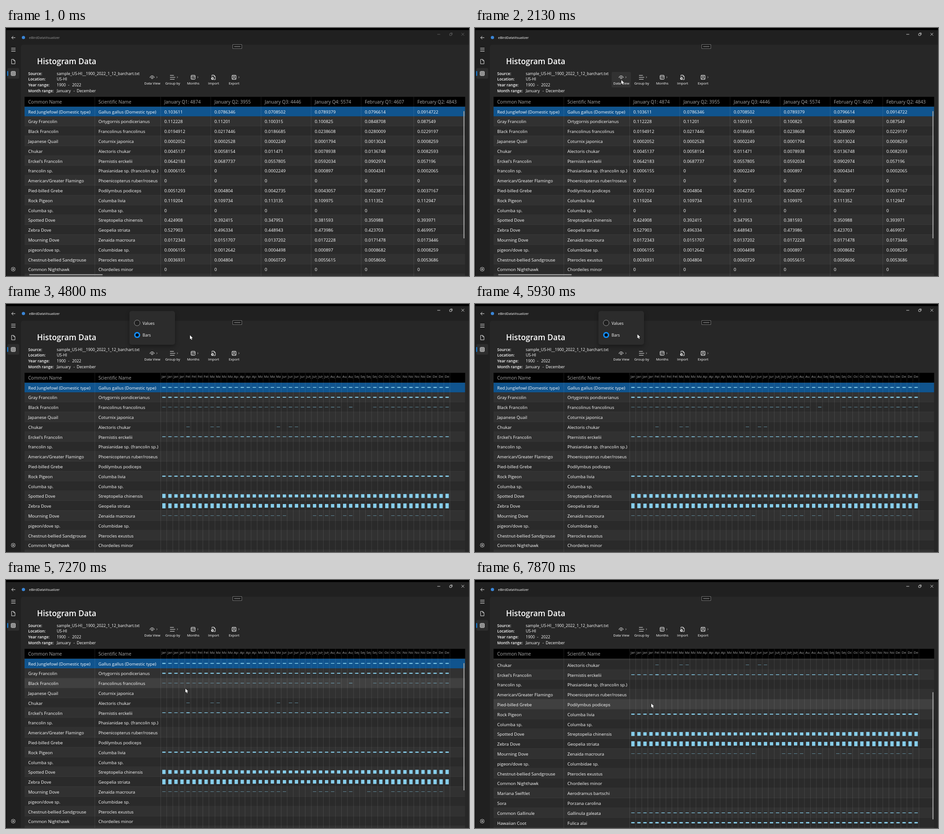
Recreate the animation shown at these times as an HTML page with a canvas. Size 1022x548 px, loop 8 s.

```html
<!DOCTYPE html>
<html lang="en">
<head>
<meta charset="utf-8">
<title>Histogram Data</title>
<style>
html, body { margin: 0; width: 100%; height: 100%; overflow: hidden; background: #202020; }
canvas { display: block; width: 1022px; height: 548px; }
</style>
</head>
<body>
<canvas id="stage"></canvas>
<script>
const W = 1022, H = 548, LOOP = 8000, TICK = 1000 / 15;
const canvas = document.getElementById('stage');
const ctx = canvas.getContext('2d');
const dpr = window.devicePixelRatio || 1;
canvas.width = W * dpr;
canvas.height = H * dpr;

const FONT = '"Open Sans", "Noto Sans", sans-serif';
const TOP = 173.6, ROW = 21.8, LEFT = 41, RIGHT = 1013.5;
const BAR_LEFT = 341.5, PITCH = 13.3, BARS = 48;
const SKY = '#87ceeb';

const columns = [
  [196, 'Scientific Name'], [341.5, 'January Q1: 4874'], [452, 'January Q2: 3955'],
  [563, 'January Q3: 4446'], [673.5, 'January Q4: 5574'],
  [784, 'February Q1: 4607'], [900, 'February Q2: 4843']
];
const months = 'January February March April May June July August September October November December'.split(' ');

const birds = `Red Junglefowl (Domestic type)|Gallus gallus (Domestic type)|0.103611 0.0786346 0.0708502 0.0789379 0.0796614 0.0914722
Gray Francolin|Ortygornis pondicerianus|0.112228 0.11201 0.100315 0.100825 0.0848708 0.087549
Black Francolin|Francolinus francolinus|0.0194912 0.0217446 0.0186685 0.0238608 0.0280009 0.0229197
Japanese Quail|Coturnix japonica|0.0002052 0.0002528 0.0002249 0.0001794 0.0013024 0.0008259
Chukar|Alectoris chukar|0.0045137 0.0058154 0.011471 0.0078938 0.0136748 0.0082593
Erckel's Francolin|Pternistis erckelii|0.0642183 0.0687737 0.0557805 0.0592034 0.0902974 0.057196
francolin sp.|Phasianidae sp. (francolin sp.)|0.0006155 0 0.0002249 0.000897 0.0004341 0.0002065
American/Greater Flamingo|Phoenicopterus ruber/roseus|0 0 0 0 0 0
Pied-billed Grebe|Podilymbus podiceps|0.0051293 0.004804 0.0042735 0.0043057 0.0023877 0.0037167
Rock Pigeon|Columba livia|0.119204 0.109734 0.113135 0.109975 0.111352 0.112947
Columba sp.|Columba sp.|0 0 0 0 0 0
Spotted Dove|Streptopelia chinensis|0.424908 0.392415 0.347953 0.381593 0.350988 0.393971
Zebra Dove|Geopelia striata|0.527903 0.496334 0.448943 0.473986 0.423703 0.469957
Mourning Dove|Zenaida macroura|0.0172343 0.0151707 0.0137202 0.0172228 0.0171478 0.0173446
pigeon/dove sp.|Columbidae sp.|0.0006155 0.0012642 0.0004498 0.000897 0.0008682 0.0008259
Chestnut-bellied Sandgrouse|Pterocles exustus|0.0036931 0.004804 0.0060729 0.0055615 0.0058606 0.0053686
Common Nighthawk|Chordeiles minor|0 0 0 0 0 0
Mariana Swiftlet|Aerodramus bartschi|
Sora|Porzana carolina|
Common Gallinule|Gallinula galeata|
Hawaiian Coot|Fulica alai|
||`.split('\n').map(line => {
  const [name, latin, nums] = line.split('|');
  return { name, latin, nums: nums ? nums.split(' ') : [] };
});

// yearly level, midyear dip and scatter of each row that has bars
const shape = {
  0: [.092, .022, .025], 1: [.112, .03, .012], 2: [.024, 0, .016], 5: [.068, .012, .022],
  9: [.118, .02, .03], 11: [.425, .13, .05], 12: [.52, .16, .06], 13: [.016, 0, .002],
  19: [.062, .008, .02], 20: [.14, .015, .035]
};
const gaps = { 2: [30, 32, 33, 34], 13: [21, 22, 23, 24, 29, 32, 33, 37, 47] };
const chukar = [4, 8, 9, 19, 21, 22];

// cursor path: tick, x, y
const path = [
  [7, 18, 214], [12, 150, 205], [19, 345, 178], [20, 352, 167], [25, 335, 135], [29, 323, 115],
  [34, 323, 115], [40, 320, 90], [46, 313, 64], [49, 317, 77], [51, 316, 73], [67, 316, 73],
  [72, 406, 69], [80, 406, 69], [84, 332, 72], [86, 332, 72], [92, 385, 62], [96, 424, 78],
  [99, 420, 82], [100, 412, 85], [103, 330, 114], [104, 326, 118], [108, 385, 228],
  [109, 396, 240], [112, 391, 252], [118, 389, 273]
];

function cursorAt(k) {
  if (k < path[0][0]) return null;
  for (let i = 1; i < path.length; i++) {
    const [a, ax, ay] = path[i - 1], [b, bx, by] = path[i];
    if (k <= b) {
      const u = (k - a) / (b - a);
      return { x: ax + (bx - ax) * u, y: ay + (by - ay) * u };
    }
  }
  const [, x, y] = path[path.length - 1];
  return { x, y };
}

const clamp = v => Math.max(0, Math.min(1, v));

function noise(n) {
  const v = Math.sin(n * 12.9898) * 43758.5453;
  return v - Math.floor(v);
}

function share(r, c) {
  if (c < birds[r].nums.length) return +birds[r].nums[c];
  if (r === 4) return chukar.includes(c) ? .015 : 0;
  if (!shape[r] || (gaps[r] && gaps[r].includes(c))) return 0;
  const [level, dip, scatter] = shape[r];
  const mid = Math.sin(Math.PI * c / 46) ** 2;
  return level - dip * mid + scatter * (noise(c + r * 61) - .5);
}

function rect(x, y, w, h, color) {
  ctx.fillStyle = color;
  ctx.fillRect(x, y, w, h);
}

function round(x, y, w, h, r, fill, stroke) {
  ctx.beginPath();
  ctx.roundRect(x, y, w, h, r);
  if (fill) { ctx.fillStyle = fill; ctx.fill(); }
  if (stroke) { ctx.strokeStyle = stroke; ctx.stroke(); }
}

function disc(x, y, r, fill, stroke) {
  ctx.beginPath();
  ctx.arc(x, y, r, 0, Math.PI * 2);
  if (fill) { ctx.fillStyle = fill; ctx.fill(); }
  if (stroke) { ctx.strokeStyle = stroke; ctx.stroke(); }
}

function text(str, x, y, size, color = '#fff', weight = 400, align = 'left') {
  ctx.font = `${weight} ${size}px ${FONT}`;
  ctx.textAlign = align;
  ctx.fillStyle = color;
  ctx.fillText(str, x, y);
}

function line(color, width, ...pts) {
  ctx.strokeStyle = color;
  ctx.lineWidth = width;
  ctx.beginPath();
  for (let i = 0; i < pts.length; i += 2) ctx.lineTo(pts[i], pts[i + 1]);
  ctx.stroke();
}

function drawFrame(active) {
  rect(0, 0, W, H, '#202020');
  round(33, 37, 1000, 530, 5, '#272727');
  rect(0, 0, W, 4.5, '#000');
  rect(0, 0, 1, H, '#080808');

  const ink = '#e6e6e6';
  line(ink, 1, 20.5, 21.3, 12.5, 21.3);
  line(ink, 1, 16, 17.8, 12.5, 21.3, 16, 24.8);
  for (const y of [44.5, 48, 51.5]) line(ink, 1, 11.5, y, 21, y);
  line(ink, 1, 17, 69.3, 12.3, 69.3, 12.3, 79.2, 19.9, 79.2, 19.9, 72.3, 17, 69.3, 17, 72.3, 19.9, 72.3);
  round(3, 88.5, 26, 23.5, 3, '#2d2d2d');
  round(2.6, 95, 2.2, 11, 1.1, '#1783e0');
  ctx.lineWidth = 1;
  round(11.5, 96, 9, 9, 1, null, '#fff');
  for (const d of [3, 6]) {
    line('#fff', .8, 11.5 + d, 96, 11.5 + d, 105);
    line('#fff', .8, 11.5, 96 + d, 20.5, 96 + d);
  }
  ctx.lineWidth = 1;
  ctx.beginPath();
  for (let i = 0; i <= 48; i++) {
    const a = i * Math.PI / 24, r = 4.2 + .55 * Math.cos(a * 8);
    ctx.lineTo(16 + r * Math.cos(a), 533 + r * Math.sin(a));
  }
  ctx.strokeStyle = ink;
  ctx.stroke();
  disc(16, 533, 1.5, null, ink);

  disc(38.5, 21, 3.6, '#3a86d8');
  text('eBirdDataVisualizer', 51, 23.8, 7.45, active ? '#fff' : '#999');
  const cap = active ? '#e4e4e4' : '#666';
  line(cap, .9, 952, 14, 958.5, 14);
  ctx.lineWidth = .9;
  round(979.2, 12.3, 4.4, 4.4, .8, null, cap);
  line(cap, .9, 980.8, 10.9, 985, 10.9, 985, 15.2);
  line(cap, .9, 1005.4, 10.8, 1011.4, 16.8);
  line(cap, .9, 1011.4, 10.8, 1005.4, 16.8);

  ctx.lineWidth = 1;
  round(500.5, 36.5, 20, 9, 0, '#141414', '#777');
  rect(503.5, 39.7, 14, 2.6, '#5c5c5c');
}

function drawHead() {
  text('Histogram Data', 68.5, 79.7, 17.3, '#fff', 600);
  const facts = ['Source:', 'Location:', 'Year range:', 'Month range:'];
  facts.forEach((s, i) => text(s, 49, 103.6 + 12.85 * i, 8.7, '#fff', 600));
  text('sample_US-HI__1900_2022_1_12_barchart.txt', 112, 103.6, 8.75);
  text('US-HI', 112, 116.4, 8.75);
  [['1900', 112], ['-', 137], ['2022', 146]].forEach(([s, x]) => text(s, x, 129.3, 8.75));
  [['January', 112], ['-', 149], ['December', 156]].forEach(([s, x]) => text(s, x, 142.2, 8.75));
}

function drawTools(hover) {
  const ink = '#f0f0f0';
  if (hover) round(301.5, 97, 42.5, 34.5, 3, '#323232');
  [['Data View', 323], ['Group by', 368], ['Months', 413.3], ['Import', 458.3], ['Export', 503.5]]
    .forEach(([s, x]) => text(s, x, 124.5, 7.65, '#fff', 400, 'center'));
  for (const x of [333, 378.3, 423.3, 514]) line('#ccc', .8, x - .8, 107, x + .9, 108.8, x - .8, 110.6);

  ctx.strokeStyle = ink;
  ctx.lineWidth = 1;
  ctx.beginPath();
  ctx.moveTo(317.7, 110);
  ctx.bezierCurveTo(319, 104, 326, 104, 327.6, 110);
  ctx.stroke();
  disc(322.6, 110, 2, null, ink);

  line(ink, 1, 362, 104.7, 370.5, 104.7);
  line(ink, 1, 362, 109, 373.5, 109);
  line(ink, 1, 362, 113.3, 372, 113.3);

  ctx.lineWidth = 1;
  round(408.5, 104.4, 9, 9, 1.5, null, ink);
  line(ink, 1, 408.5, 107, 417.5, 107);
  for (const x of [410.5, 413, 415.5]) rect(x - .6, 109, 1.2, 1.2, ink);
  for (const x of [410.5, 413]) rect(x - .6, 111, 1.2, 1.2, ink);

  line(ink, 1, 454.7, 108, 454.7, 104, 459, 104, 462, 107, 462, 114, 458.5, 114);
  line(ink, 1, 459, 104, 459, 107, 462, 107);
  disc(455.8, 111.6, 2.9, ink);
  line('#272727', .8, 454.2, 111.6, 457.3, 111.6);
  line('#272727', .8, 456, 110.2, 457.4, 111.6, 456, 113);

  ctx.lineWidth = 1;
  round(498.8, 104.4, 9.2, 9.2, 1.2, null, ink);
  line(ink, 1, 501, 104.4, 501, 107.3, 505.5, 107.3, 505.5, 104.4);
  line(ink, 1, 500.8, 113.6, 500.8, 110, 506, 110, 506, 113.6);
}

function drawTable(bars, scroll, hoverRow) {
  ctx.save();
  ctx.beginPath();
  ctx.rect(LEFT, TOP, RIGHT - LEFT, H - TOP);
  ctx.clip();
  birds.forEach((bird, r) => {
    const y = TOP + ROW * r - scroll;
    if (y < TOP - ROW || y > H) return;
    const hot = r === hoverRow;
    let fill = r % 2 ? '#313131' : '#2a2a2a';
    if (r === 0) fill = hot ? '#0868b6' : '#10548e';
    else if (hot) fill = '#404040';
    rect(LEFT, y, RIGHT - LEFT, ROW, fill);
    if (r) rect(LEFT, y + ROW - .8, RIGHT - LEFT, .8, '#3c3c3c');
    text(bird.name, 49, y + 14.9, 9.55);
    text(bird.latin, 204, y + 14.9, 9.55);
    if (!bars) {
      bird.nums.forEach((s, i) => text(s, columns[i + 1][0] + 8, y + 14.9, 9.55));
      return;
    }
    for (let c = 0; c < BARS; c++) {
      const v = share(r, c);
      if (v < .0125) continue;
      const h = Math.max(.8, v * 21.5);
      ctx.globalAlpha = v < .025 ? .75 : 1;
      rect(BAR_LEFT + PITCH * c + 3.4, y + 10.7 - h / 2, 7.4, h, SKY);
      ctx.globalAlpha = 1;
    }
  });
  ctx.restore();

  rect(LEFT, 152, RIGHT - LEFT, TOP - 152, '#000');
  const rule = x => {
    rect(x - .4, 152, .8, TOP - 152, '#262626');
    rect(x - .4, TOP, .8, H - TOP, 'rgba(255,255,255,.13)');
  };
  const grey = '#a8a8a8';
  text('Common Name', 49, 167.1, 10.1, grey);
  columns.forEach(([x, label], i) => {
    if (bars && i > 1) return;
    rule(x);
    if (!bars || i === 0) text(label, x + 8, 167.1, 10.1, grey);
  });
  if (!bars) return;
  for (let c = 0; c < BARS; c++) {
    const x = BAR_LEFT + PITCH * c;
    rule(x + PITCH);
    ctx.save();
    ctx.beginPath();
    ctx.rect(x, 152, 11.8, 20);
    ctx.clip();
    text(months[c >> 2], x + 2, 162.8, 7.4, grey);
    ctx.restore();
  }
}

function drawRadio(label, y, on, pressed) {
  const x = 289.5;
  ctx.lineWidth = .9;
  if (on) {
    disc(x, y, 6.7, '#128cf5');
    disc(x, y, 3.5, '#000');
  } else if (pressed) {
    disc(x, y, 6.4, '#383838', '#474747');
    disc(x, y, 3.2, '#000');
  } else {
    disc(x, y, 6.3, '#202020', '#a2a2a2');
  }
  text(label, 301.5, y + 3.7, 8.7);
}

function drawPopup(bars, pressed, alpha) {
  ctx.save();
  ctx.globalAlpha = alpha;
  ctx.shadowColor = 'rgba(0,0,0,.35)';
  ctx.shadowBlur = 10 * dpr;
  ctx.shadowOffsetY = 4 * dpr;
  round(272.5, 15.5, 100.5, 74.5, 5, '#2c2c2c');
  ctx.shadowColor = 'transparent';
  drawRadio('Values', 41.8, !bars, false);
  drawRadio('Bars', 68.4, bars, pressed);
  ctx.restore();
}

function drawCursor({ x, y }) {
  const pts = [0, 0, 0, 8.8, 2, 7, 3.4, 10.2, 4.9, 9.5, 3.5, 6.4, 6.3, 6.2];
  ctx.beginPath();
  for (let i = 0; i < pts.length; i += 2) ctx.lineTo(x + pts[i], y + pts[i + 1]);
  ctx.closePath();
  ctx.lineJoin = 'round';
  ctx.lineWidth = 1;
  ctx.strokeStyle = '#000';
  ctx.stroke();
  ctx.fillStyle = '#fff';
  ctx.fill();
  ctx.lineJoin = 'miter';
}

function draw(time) {
  const k = Math.floor((time % LOOP) / TICK + .06);
  const popup = k >= 34 && k < 96;
  const bars = k >= 68;
  const scroll = 84 * (1 - (1 - clamp((k - 112) / 6)) ** 2);

  // hover states trail the cursor by one tick
  const late = popup ? null : cursorAt(k - 1);
  let hoverRow = -1, onTool = false;
  if (late) {
    if (late.x > LEFT && late.y > TOP) hoverRow = Math.floor((late.y + scroll - TOP) / ROW);
    onTool = late.x > 301 && late.x < 344 && late.y > 97 && late.y < 132;
  }

  ctx.setTransform(dpr, 0, 0, dpr, 0, 0);
  drawFrame(k >= 32);
  drawHead();
  drawTools(onTool);
  drawTable(bars, scroll, hoverRow);
  if (!bars || k >= 107) round(1009.8, 183.5 + scroll * .765, 2.2, 281.5, 1.1, '#9c9c9c');
  if (!bars) round(51, 544, 162.5, 2.2, 1.1, '#9c9c9c');
  if (popup) drawPopup(k >= 67, k >= 50, clamp((k - 33) / 3));
  const tip = cursorAt(k);
  if (tip) drawCursor(tip);
}

let start;
function loop(now) {
  if (start === undefined) start = now;
  draw(now - start);
  requestAnimationFrame(loop);
}
draw(0);
requestAnimationFrame(loop);
</script>
</body>
</html>
```
